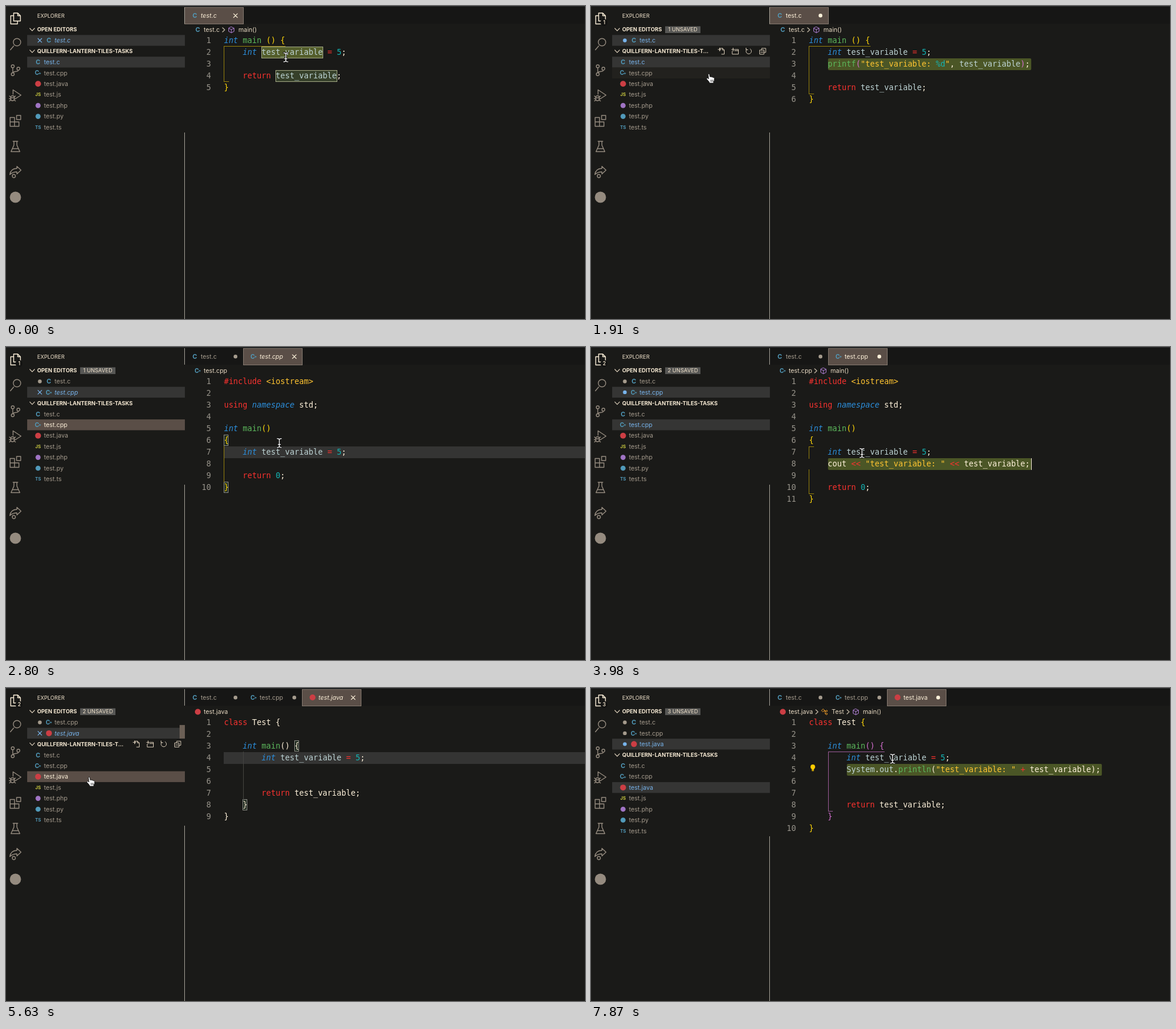
An HTML page that plays this animation: 984 px wide and 532 px high, repeating every 8000 ms.

```html
<!DOCTYPE html>
<html lang="en">
<head>
<meta charset="utf-8">
<title>Editor demo</title>
<style>
html, body { margin: 0; width: 100%; height: 100%; overflow: hidden; background: #1a1a18; }
svg { display: block; width: 984px; height: 532px; }
text { white-space: pre; }
.ui { font: 10.4px Inter, sans-serif; }
.head { font: 700 9.2px Inter, sans-serif; fill: #f5e8d2; }
.small { font: 9.1px Inter, sans-serif; fill: #f0e2cb; }
.code { font: 13.288px "DejaVu Sans Mono", monospace; }
.it { font-style: italic; }
.line { fill: none; stroke-width: 1.2; stroke-linecap: round; stroke-linejoin: round; }
</style>
</head>
<body>
<svg id="stage" viewBox="0 0 984 532" xmlns="http://www.w3.org/2000/svg"></svg>
<script>
const LOOP = 8000, BG = '#1a1a18', CREAM = '#fdf0d9', DIM = '#a59b8d', BLUE = '#78b4ec', ROW = '#353534', FOCUS = '#5a4e47';
const PROJECT = 'QUILLFERN-LANTERN-TILES-TASKS';
const FILES = ['c', 'cpp', 'java', 'js', 'php', 'py', 'ts'];

// drawing helpers
const rect = (x, y, w, h, fill, more = '') => `<rect x="${x}" y="${y}" width="${w}" height="${h}" fill="${fill}" ${more}/>`;
const text = (x, y, s, cls, fill = '', more = '') => `<text x="${x}" y="${y}" class="${cls}" ${fill && `fill="${fill}"`} ${more}>${s}</text>`;
const path = (d, color, more = '') => `<path class="line" d="${d}" stroke="${color}" ${more}/>`;
const dot = (x, y, r, fill) => `<circle cx="${x}" cy="${y}" r="${r}" fill="${fill}"/>`;
const at = (x, y, body) => `<g transform="translate(${x} ${y})">${body}</g>`;
const cross = (x, y, color) => at(x, y, path('M-3.2-3.2 3.2 3.2M3.2-3.2-3.2 3.2', color));
const chevron = (x, y) => at(x, y, path('M-2-3.5 1.8 0-2 3.5', '#c9bdab'));
const outline = (x, y, w, h, fill, stroke) => rect(x + .5, y + .5, w - 1, h - 1, fill, `stroke="${stroke}"`);

// code: tokens are separated by ¦ and begin with a colour key
const INK = { w: CREAM, i: '#2c8fdc', g: '#5cb85c', y: '#ffd70a', p: '#d46fd0', v: '#bdd3d4', n: '#14b5b5', r: '#f8322f', s: '#ffc431' };
const codeLine = s => s.split('¦').map(t =>
  `<tspan fill="${INK[t[0]]}"${t[0] === 'i' ? ' class="it"' : ''}>${t.slice(1).replace(/&/g, '&amp;').replace(/</g, '&lt;')}</tspan>`).join('');

const lineTop = n => 49 + 20 * (n - 1);
const col = c => 370.4 + 8 * c;
const mark = (n, c, len, fill, edge) => edge
  ? outline(Math.round(col(c)), lineTop(n), len * 8 + 1, 20, fill, edge)
  : rect(col(c), lineTop(n), len * 8, 20, fill);
const inserted = (n, c, len) => rect(col(c) + .4, lineTop(n), len * 8 + 1.4, 20, '#4b5626', 'rx="2"');
const current = n => rect(370, lineTop(n), 614, 20, '#343433');
const bracket = (n, c) => outline(Math.round(col(c)), lineTop(n), 8, 19, '#1f2a1f', '#8b8b85');
const guide = (d, color) => path(d, color, 'stroke-width="1" stroke-linecap="butt" shape-rendering="crispEdges"');
const GOLD = '#95800c', PLUM = '#9a5a97', EDGE = '#a3a984';

const cVar = 'w    ¦iint¦w ¦vtest_variable¦w ¦r=¦w ¦n5¦w;';
const cHead = 'iint¦w ¦gmain¦w ¦y()¦w ¦y{';
const cRet = 'w    ¦rreturn¦w ¦vtest_variable¦w;';
const cppHead = ['r#include¦w ¦s<iostream>', '', 'rusing¦w ¦inamespace¦w std;', '', 'iint¦w ¦gmain¦y()', 'y{', cVar];
const cppTail = ['', 'w    ¦rreturn¦w ¦n0¦w;', 'y}'];
const java = (outer, inner, extra = []) => [
  `rclass¦w Test ¦${outer}{`, '', `w    ¦iint¦w ¦gmain¦${inner}()¦w ¦${inner}{`, 'w    ¦' + cVar, ...extra,
  '', '', 'w        ¦rreturn¦w test_variable;', `w    ¦${inner}}`, `${outer}}`];

const mainCrumb = x => [[x, 'cube', 'main()']];
const javaCrumbs = [[384, 'class', 'Test'], [437, 'cube', 'main()']];
const javaGuide = bottom => guide(`M498 108.5H403.5V${bottom}H410`, PLUM);

const VIEWS = {
  c0: { lines: [cHead, cVar, '', cRet, 'y}'], crumbs: mainCrumb(370),
    deco: mark(2, 8, 13, '#545e2b', EDGE) + mark(4, 11, 13, '#36402a', EDGE) + guide('M474 68.5H370.5V128.5H378', GOLD) },
  c1: { lines: [cHead, cVar, 'w    ¦gprintf¦p(¦s"test_variable: ¦n%d¦s"¦w, ¦vtest_variable¦p)¦w;', '', cRet, 'y}'], crumbs: mainCrumb(370),
    deco: inserted(3, 4, 43) + guide('M474 68.5H370.5V149.5H378', GOLD), caret: [748, 3] },
  cpp0: { lines: [...cppHead, ...cppTail], crumbs: [],
    deco: current(7) + bracket(6, 0) + bracket(10, 0) + guide('M370.5 169V229', GOLD) },
  cpp1: { lines: [...cppHead, ...cppTail], crumbs: mainCrumb(382),
    deco: mark(7, 8, 13, '#4b5626') + guide('M378 169.5H370.5V229.5H378', GOLD), caret: [538, 7] },
  cpp2: { lines: [...cppHead, 'w    cout ¦r<<¦w ¦s"test_variable: "¦w ¦r<<¦w test_variable;', ...cppTail], crumbs: mainCrumb(382),
    deco: inserted(8, 4, 43) + guide('M378 169.5H370.5V189M370.5 209V249.5H378', GOLD), caret: [748, 8] },
  java0: { lines: java('w', 'w'), crumbs: [],
    deco: current(4) + bracket(3, 15) + bracket(8, 4) + guide('M403.5 109V189', '#444440') },
  java1: { lines: java('y', 'p'), crumbs: javaCrumbs,
    deco: mark(4, 12, 13, '#4b5626') + mark(7, 15, 13, '#36402a', EDGE) + javaGuide(189.5), caret: [571, 4] },
  java2: { lines: java('y', 'p'), crumbs: javaCrumbs,
    deco: mark(4, 12, 13, '#545e2b', EDGE) + mark(7, 15, 13, '#36402a', EDGE) + javaGuide(189.5), caret: [571, 4] },
  java3: { lines: java('y', 'p', ['w        ¦vSystem¦w.¦vout¦w.¦gprintln¦w(¦s"test_variable: "¦w ¦r+¦w test_variable);']), crumbs: javaCrumbs,
    deco: inserted(5, 8, 54) + javaGuide(209.5), caret: [868, 5] }
};

// each step changes part of the state
const STEPS = [
  [0, { view: 'c0', active: 'c', tabs: ['c'], open: ['c'], dirty: [], pick: 'c', focus: 0, mouse: [475.5, 87], caret: 0, bulb: 0, scroll: 0 }],
  [290, { view: 'c1', dirty: ['c'], caret: 1 }],
  [590, { mouse: [440, 104] }],
  [735, { mouse: [350, 138] }],
  [880, { mouse: [272, 152], caret: 0 }],
  [1030, { mouse: [232, 153] }],
  [1320, { mouse: [224, 143], caret: 1 }],
  [1470, { mouse: [210, 130] }],
  [1620, { mouse: [203, 123] }],
  [1910, { caret: 0 }],
  [2210, { pick: 'cpp', focus: 1 }],
  [2357, { view: 'cpp0', active: 'cpp', tabs: ['c', 'cpp'], open: ['cpp'], scroll: 1 }],
  [2504, { open: ['c', 'cpp'], scroll: 0, mouse: [250, 129] }],
  [2652, { mouse: [390, 150] }],
  [2800, { mouse: [464.5, 163] }],
  [2945, { mouse: [463, 172] }],
  [3090, { mouse: [460.5, 180] }],
  [3240, { focus: 0 }],
  [3380, { view: 'cpp1', caret: 1 }],
  [3680, { view: 'cpp2', dirty: ['c', 'cpp'] }],
  [4280, { mouse: [430, 188], caret: 0 }],
  [4430, { mouse: [350, 212] }],
  [4580, { mouse: [262, 220], caret: 1 }],
  [4730, { mouse: [202, 200] }],
  [4880, { mouse: [162, 172] }],
  [5030, { mouse: [144, 159], caret: 0 }],
  [5480, { pick: 'java', focus: 1 }],
  [5630, { view: 'java0', active: 'java', tabs: ['c', 'cpp', 'java'], open: ['cpp', 'java'], scroll: 1 }],
  [5775, { open: ['c', 'cpp', 'java'], scroll: 0 }],
  [5925, { mouse: [205, 150] }],
  [6075, { mouse: [380, 130] }],
  [6225, { mouse: [500, 121] }],
  [6370, { mouse: [512.5, 120], focus: 0 }],
  [6520, { view: 'java1', caret: 1, bulb: 4 }],
  [6820, { view: 'java2' }],
  [6970, { caret: 0 }],
  [7270, { view: 'java3', dirty: ['c', 'cpp', 'java'], caret: 1 }],
  [7870, { caret: 0, bulb: 5 }]
];

function fileIcon(x, y, id) {
  const label = (s, size, color) => text(x, y + size * .36, s, 'ui', color, `text-anchor="middle" style="font-weight:700;font-size:${size}px"`);
  switch (id) {
    case 'c': return label('C', 10.5, '#519aba');
    case 'cpp': return label('C<tspan font-size="7" dx="-1" dy="-.8">+</tspan>', 10, '#519aba');
    case 'js': return label('JS', 7.6, '#cbcb41');
    case 'ts': return label('TS', 7.6, '#519aba');
    default: return dot(x, y, id === 'java' ? 5 : 4.3, { java: '#cc3e44', php: '#a074c4', py: '#519aba' }[id]);
  }
}

function activityBar(count) {
  const g = '#958b7f';
  const icon = (y, d, color = g) => at(16, y, path(d, color, 'style="stroke-width:1.4"'));
  let s = icon(21, 'M-3-9H4L8.5-4.5V4.5H-3ZM4-9V-4.5H8.5M-3-4.5H-8V9.5H3.5V4.5', CREAM) +
    icon(65, 'M-3 3-8.5 9.5M9-3.5A6.3 6.3 0 1 1-3.6-3.5A6.3 6.3 0 1 1 9-3.5') +
    icon(109, 'M-4.5-4V4.5M-2-6.5A2.5 2.5 0 1 1-7-6.5A2.5 2.5 0 1 1-2-6.5M-2 7A2.5 2.5 0 1 1-7 7A2.5 2.5 0 1 1-2 7M7.5-2.5A2.5 2.5 0 1 1 2.5-2.5A2.5 2.5 0 1 1 7.5-2.5M5 0C5 4-4.5 1-4.5 4.5') +
    icon(152, 'M-4-2V-9.5L9.5-.5 1 5M-8 3.5A3 3 0 0 1-2 3.5V6A3 3 0 0 1-8 6ZM-8 4H-2M-10 1-8 3M0 1-2 3M-10.5 5.5H-8M-2 5.5H.5M-10 9.5-8 7.5M0 9.5-2 7.5') +
    icon(195, 'M-9-5.5H-1.5V9.5H-9ZM-9 2H6V9.5H-1.5M2-9H9V-2H2Z') +
    icon(239, 'M-4-9H4M-2.5-9V-2.5L-7.5 8.5H7.5L2.5-2.5V-9M-5 3.5H5') +
    icon(282, 'M2.5-9.5 9.5-3 2.5 3.5V0C-3 0-6.5 1.5-9.5 4.5C-8.5-2-4.5-5.8 2.5-6ZM0 7A2.7 2.7 0 1 1-5.4 7A2.7 2.7 0 1 1 0 7') +
    dot(16, 325, 9.5, g);
  if (count) s += dot(22, 28, 6, '#131312') + text(22.5, 31, count, 'small', '', 'text-anchor="middle" style="font-weight:600;font-size:8.4px"');
  return s;
}

function headerTools(y) {
  const icon = (x, d) => at(x, y, path(d, '#d9ccb8', 'style="stroke-width:1"'));
  return icon(222, 'M-3-1V-5H1.5L4.5-2V5H0M1.5-5V-2H4.5M-6-3H-1M-3.5-5.5V-.5') +
    icon(245, 'M-5 0V5H5.5V-3H0M-6-3H-1M-3.5-5.5V-.5M-1-1H5.5') +
    icon(268, 'M-3.5-3A4.6 4.6 0 1 0 2.5-4M-4.5-5.5V-2.5H-1.5') +
    icon(292, 'M-2-2V-5H5V2H2M-5-2H2V5H-5ZM-3.5 1.5H.5');
}

const status = (x, y, dirty, color) => dirty ? dot(x, y, 3.2, color) : cross(x, y, color);
const rowY = i => 40 + 18.45 * i;

function sidebar(s) {
  const [mx, my] = s.mouse, inside = mx < 304, shown = s.open.length;
  const band = (i, fill) => rect(36, rowY(i) - 9.2, 268, 18.4, fill);
  const down = y => at(44.5, y, path('M-4-2 0 2.2 4-2', '#d9ccb8'));
  let out = text(53, 20, 'EXPLORER', 'small') + down(40) + text(53, 43.3, 'OPEN EDITORS', 'head');
  if (s.dirty.length) out += rect(126, 34.5, 60, 11.5, '#575755') + text(156, 43.3, s.dirty.length + ' UNSAVED', 'small', '', 'text-anchor="middle"');

  s.open.forEach((id, k) => {
    const y = rowY(k + 1), on = id === s.active, dirty = s.dirty.includes(id);
    if (on) out += band(k + 1, ROW);
    if (on || dirty) out += status(57.5, y, dirty, on ? BLUE : DIM);
    out += fileIcon(73, y, id) + text(82.5, y + 3.7, 'test.' + id, 'ui' + (on && !dirty ? ' it' : ''), on ? BLUE : DIM);
  });
  if (s.scroll) out += rect(295, rowY(shown) - 14, 9, 23, '#6b5f55');

  const hy = rowY(shown + 1);
  out += down(hy) + text(53, hy + 3.3, inside ? PROJECT.slice(0, 25) + '...' : PROJECT, 'head');
  if (inside) out += headerTools(hy);

  FILES.forEach((id, k) => {
    const i = shown + 2 + k, y = rowY(i), on = id === s.pick;
    if (on) out += band(i, s.focus ? FOCUS : ROW);
    else if (inside && Math.abs(my - 7 - y) < 9.2) out += band(i, '#22211e');
    out += fileIcon(54.5, y, id) + text(64.5, y + 3.7, 'test.' + id, 'ui', on ? (s.focus ? CREAM : BLUE) : DIM);
  });
  const end = Math.round(rowY(shown + 1 + FILES.length) + 9);
  return out + rect(303, 2, 1, 28, '#a5a197') + rect(303, end, 1, 532 - end, '#a5a197');
}

function tabBar(s) {
  let out = rect(304, 1, 680, 29, '#161615');
  s.tabs.forEach((id, k) => {
    const x = 304 + 100 * k, on = id === s.active, dirty = s.dirty.includes(id), ink = on ? CREAM : DIM;
    if (on) out += rect(x, 2, 100, 28, FOCUS) + guide(`M${x - .5} 2.5H${x + 99.5}V30.5H${x - .5}Z`, '#85796f');
    out += fileIcon(x + 17, 16, id) + text(x + 27, 19.8, 'test.' + id, 'ui' + (on && !dirty ? ' it' : ''), ink) + status(x + 86, 16.3, dirty, ink);
  });
  return out;
}

function crumbs(s, list) {
  const shape = {
    cube: path('M0-5 4.5-2.7V2.7L0 5-4.5 2.7V-2.7ZM-4.5-2.7 0-.4 4.5-2.7M0-.4V5', '#b180d7', 'style="stroke-width:1"'),
    class: path('M-5-2.5-2.5-5 0-2.5-2.5 0ZM-1-1.5H2M1-1.5V3.5H2M2-1.5 3.5-3 5-1.5 3.5 0ZM2 3.5 3.5 2 5 3.5 3.5 5Z', '#ee9d28', 'style="stroke-width:1"')
  };
  return fileIcon(326, 40.5, s.active) + text(336, 44, 'test.' + s.active, 'ui', '#e8dac3') +
    list.map(([x, kind, label]) => chevron(x, 40.5) + at(x + 13, 40.5, shape[kind]) + text(x + 25, 44, label, 'ui', '#e8dac3')).join('');
}

function editor(s) {
  const v = VIEWS[s.view];
  let out = crumbs(s, v.crumbs) + v.deco;
  v.lines.forEach((l, i) => {
    const y = 63 + 20 * i;
    out += text(348.5, y, i + 1, 'code', '#97938a', 'text-anchor="end"');
    if (l) out += text(370.4, y, codeLine(l), 'code');
  });
  if (s.caret && v.caret) out += rect(v.caret[0], lineTop(v.caret[1]), 1, 20, '#f4ead8');
  if (s.bulb) out += at(377, lineTop(s.bulb) + 6, dot(0, -1, 3.9, '#ffcc00') + rect(-2, 1.5, 4, 3, '#ffcc00') + rect(-1.7, 5, 3.4, 1.2, '#ffcc00'));
  return out;
}

const HAND = 'M-4-6.2C-4-8-1.6-8-1.4-6.2L-.8-2.4C.2-3.4 1.7-3 2-1.9C3-2.7 4.3-2.2 4.6-1.1C5.7-1.7 6.8-.9 6.8 .2L6.5 3.6 5.2 6V8H-2V6.4L-6.2 1.4C-7 0-5.6-1-4.3-.2L-3 1Z';
const BEAM = 'M-3.6-7.4C-1.5-7.4 0-6.8 0-5C0-6.8 1.5-7.4 3.6-7.4M0-5V5.4M-3.6 7.8C-1.5 7.8 0 7.2 0 5.4C0 7.2 1.5 7.8 3.6 7.8M-2 2.6H2';

function pointer([x, y]) {
  return at(x, y, x < 304
    ? `<path d="${HAND}" fill="#fff" stroke="#111" stroke-width=".9"/>` + path('M.6 2.6V5.6M2.5 2.6V5.6M4.4 2.6V5.6', '#333', 'style="stroke-width:.8"')
    : path(BEAM, '#111', 'style="stroke-width:3"') + path(BEAM, '#fff', 'style="stroke-width:1.3"'));
}

const stage = document.getElementById('stage');
const begin = performance.now();
let shown = -1;

function draw() {
  const t = (performance.now() - begin) % LOOP;
  const past = STEPS.filter(([time]) => time <= t);
  if (past.length !== shown) {
    shown = past.length;
    const s = Object.assign({}, ...past.map(p => p[1]));
    stage.innerHTML = rect(0, 0, 984, 532, BG) + rect(0, 0, 984, 1, '#2c2e30') +
      activityBar(s.dirty.length) + tabBar(s) + sidebar(s) + editor(s) + pointer(s.mouse);
  }
  requestAnimationFrame(draw);
}
draw();
</script>
</body>
</html>
```
